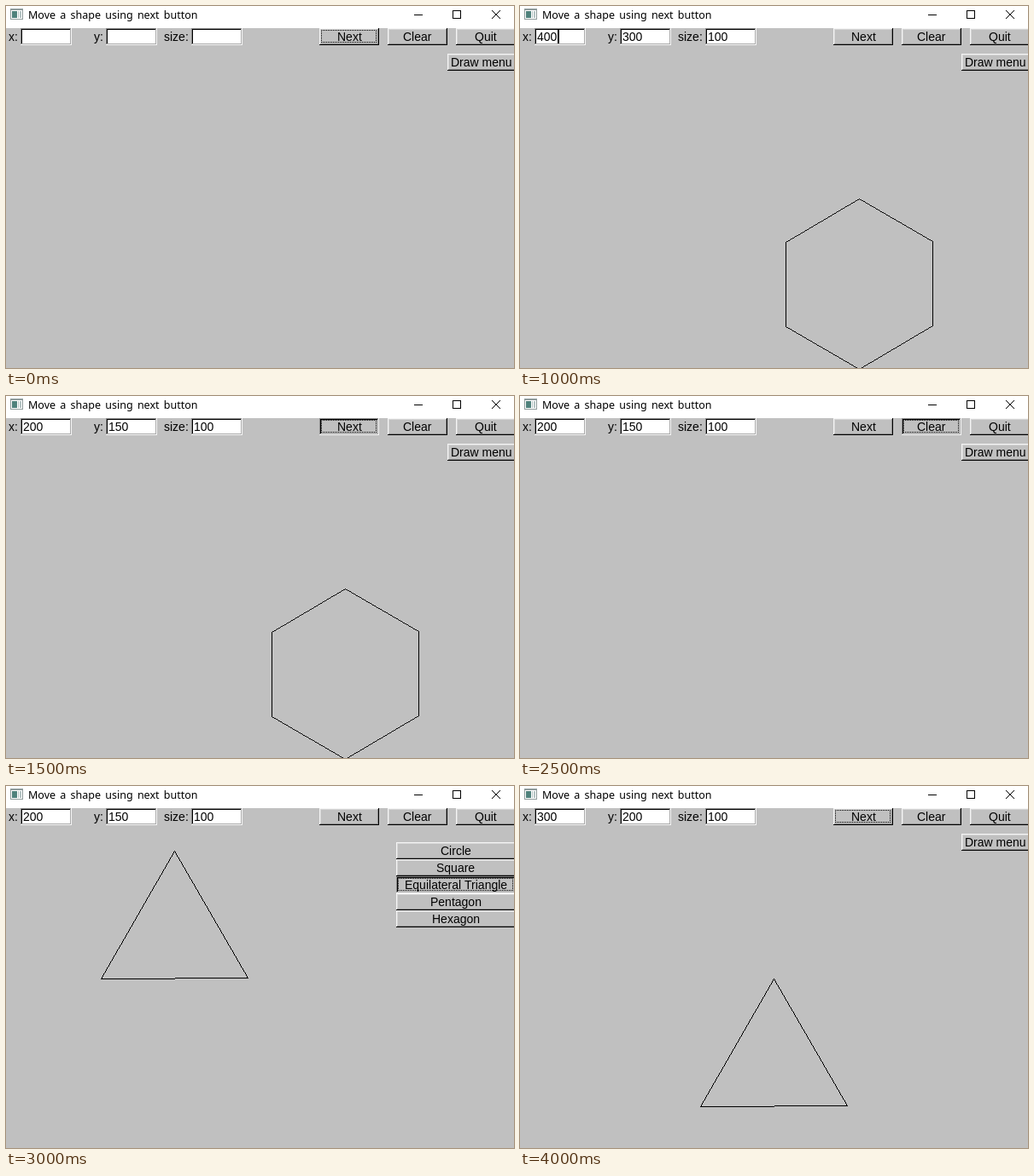
An HTML page with a canvas for the animation above (4.5 s loop, 595x425 px).

```html
<!DOCTYPE html>
<html lang="en">
<head>
<meta charset="utf-8">
<title>Move a shape using next button</title>
<style>
  html, body { margin: 0; width: 100%; height: 100%; overflow: hidden; background: #c0c0c0; }
  canvas { display: block; }
</style>
</head>
<body>
<canvas id="stage" width="595" height="425"></canvas>
<script>
const ctx = document.getElementById('stage').getContext('2d');
const STEP = 500;
const LEFT = -3, TOP = 26; // client area origin
const GRAY = '#c0c0c0';
// Bevel colours: outer bottom-right, outer top-left, inner bottom-right, inner top-left
const RAISED = ['#000', '#f5f5f5', '#8a8a8a', '#d5d5d5'];
const SUNKEN = ['#f5f5f5', '#8a8a8a', '#aaa', '#000'];
const MENU = ['Circle', 'Square', 'Equilateral Triangle', 'Pentagon', 'Hexagon'];

const shape = (sides, x, y) => ({ sides, x, y });
const states = [
  { x: '', y: '', size: '', focus: 'Next' },
  { x: 400, y: 300, menu: true, pressed: 'Hexagon' },
  { x: 400, y: 300, shape: shape(6, 400, 300), caret: true },
  { x: 200, y: 150, shape: shape(6, 400, 300), pressed: 'Next' },
  { x: 200, y: 150, shape: shape(6, 200, 250), focus: 'Next' },
  { x: 200, y: 150, pressed: 'Clear' },
  { x: 200, y: 150, shape: shape(3, 200, 150), menu: true, pressed: 'Equilateral Triangle' },
  { x: 300, y: 200, shape: shape(3, 200, 150), pressed: 'Next' },
  { x: 300, y: 200, shape: shape(3, 300, 300), focus: 'Next' }
];

function rect(color, x, y, w, h) {
  ctx.fillStyle = color;
  ctx.fillRect(x, y, w, h);
}

function text(label, x, baseline) {
  ctx.fillStyle = '#000';
  ctx.fillText(label, Math.round(x), baseline);
}

function bevel(x, y, w, h, colors, fill) {
  for (let i = 0; i < 2; i++) {
    const side = 2 * i;
    rect(colors[side], x + i, y + i, w - 2 * i, h - 2 * i);
    rect(colors[side + 1], x + i, y + i, w - 2 * i - 1, h - 2 * i - 1);
  }
  rect(fill, x + 2, y + 2, w - 4, h - 4);
}

function dottedRect(x, y, w, h) {
  for (let i = 0; i < w; i += 2) {
    rect('#000', x + i, y, 1, 1);
    rect('#000', x + i, y + h - 1, 1, 1);
  }
  for (let j = 0; j < h; j += 2) {
    rect('#000', x, y + j, 1, 1);
    rect('#000', x + w - 1, y + j, 1, 1);
  }
}

function button(label, x, y, w, state) {
  x += LEFT;
  y += TOP;
  const pressed = state.pressed === label;
  bevel(x, y, w, 20, pressed ? SUNKEN : RAISED, GRAY);
  text(label, x + (w - ctx.measureText(label).width) / 2, y + 15);
  if (pressed || state.focus === label) dottedRect(x + 2, y + 2, w - 5, 15);
}

function field(label, value, x) {
  x += LEFT;
  text(label, x - 3 - ctx.measureText(label).width, TOP + 15);
  bevel(x, TOP, 60, 20, SUNKEN, '#fff');
  text(value, x + 3, TOP + 15);
}

function line([x1, y1], [x2, y2]) {
  const steps = Math.max(Math.abs(x2 - x1), Math.abs(y2 - y1));
  for (let i = 0; i <= steps; i++) {
    const k = i / steps;
    rect('#000', Math.round(x1 + (x2 - x1) * k), Math.round(y1 + (y2 - y1) * k), 1, 1);
  }
}

function polygon({ sides, x, y }) {
  // The tiny angle offset decides which way whole coordinates truncate
  const points = Array.from({ length: sides }, (_, i) => {
    const angle = 2 * Math.PI * i / sides - 1e-9;
    return [x + LEFT + Math.trunc(100 * Math.sin(angle)),
            y + TOP + Math.trunc(-100 * Math.cos(angle))];
  });
  points.forEach((p, i) => line(p, points[(i + 1) % sides]));
}

function titleBar() {
  rect('#fff', 0, 0, 595, TOP);
  rect('#8f9b9b', 5, 3, 15, 13);
  rect('#fff', 6, 5, 13, 10);
  rect('#4f827c', 7, 6, 6, 8);
  rect('#b5c4c4', 14, 6, 1, 8);
  rect('#b5c4c4', 16, 6, 2, 8);

  ctx.font = '12.5px "Noto Sans", sans-serif';
  ctx.wordSpacing = '2px';
  text('Move a shape using next button', 26, 15);
  ctx.wordSpacing = '0px';

  rect('#000', 478, 10, 10, 1);
  ctx.strokeStyle = '#000';
  ctx.lineWidth = 1;
  ctx.strokeRect(523.5, 5.5, 9, 9);
  ctx.beginPath();
  ctx.moveTo(569, 5);
  ctx.lineTo(579, 15);
  ctx.moveTo(579, 5);
  ctx.lineTo(569, 15);
  ctx.stroke();
}

function draw(state) {
  rect(GRAY, 0, 0, 595, 425);
  titleBar();
  ctx.font = '14px "Liberation Sans", Arial, sans-serif';
  field('x:', state.x, 20);
  field('y:', state.y, 120);
  field('size:', state.size ?? 100, 220);
  if (state.caret) rect('#000', 44, 28, 2, 16);

  ['Next', 'Clear', 'Quit'].forEach((label, i) => button(label, 370 + 80 * i, 0, 70, state));
  if (state.menu) MENU.forEach((label, i) => button(label, 460, 40 + 20 * i, 140, state));
  else button('Draw menu', 520, 30, 80, state);

  if (state.shape) polygon(state.shape);
}

const start = performance.now();
function frame() {
  const elapsed = performance.now() - start;
  draw(states[Math.floor(elapsed / STEP) % states.length]);
  requestAnimationFrame(frame);
}
frame();
</script>
</body>
</html>
```
